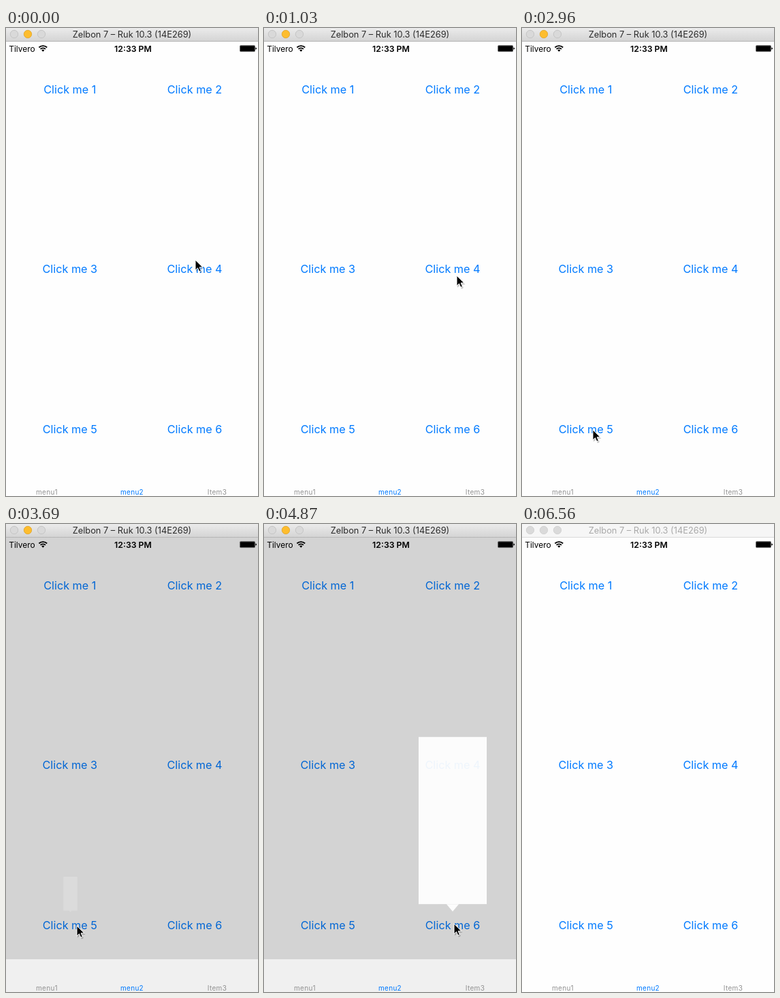
These frames come from a looping animation (370x686 px, 6660 ms). An HTML page:

```html
<!DOCTYPE html>
<html lang="en">
<head>
<meta charset="utf-8">
<title>Popover menus</title>
<style>
  html, body { margin: 0; width: 100%; height: 100%; overflow: hidden; background: #fefefe; }
  svg { display: block; width: 370px; height: 686px; font-family: Inter, Roboto, sans-serif; }
  text { text-anchor: middle; }
  .lamp { fill: #d9d9d9; stroke: #bfbfbf; stroke-width: .8; }
  .on { fill: #fdbd2e; stroke: #e0a325; }
  .title { font-size: 12.8px; fill: #2b2b2b; }
  .inactive .bar { fill: #f6f6f6; }
  .inactive .edge { fill: #dadada; }
  .inactive .title { fill: #a9a9a9; }
  .inactive .lamp { fill: #dadada; stroke: #cdcdcd; }
  .status { font-size: 12px; }
  .clock { font-size: 12.3px; font-weight: 600; }
  .button { font-size: 16.2px; fill: #007aff; }
  .tab { font-size: 10px; letter-spacing: .3px; fill: #929292; }
  .selected { fill: #007aff; }
</style>
</head>
<body>
<svg id="stage" viewBox="0 0 370 686">
  <defs>
    <linearGradient id="chrome" x2="0" y2="1">
      <stop stop-color="#ebebeb"/>
      <stop offset="1" stop-color="#d3d3d3"/>
    </linearGradient>
  </defs>
  <rect width="370" height="686" fill="#fefefe"/>
  <g id="buttons"></g>
  <rect id="dim" y="20" width="370" height="618" fill-opacity=".17"/>
  <rect id="tabBar" y="638" width="370" height="48" fill="#f0f0f0"/>

  <text class="tab" x="60" y="684">menu1</text>
  <text class="tab selected" x="185" y="684">menu2</text>
  <text class="tab" x="310" y="684">Item3</text>

  <text class="status" x="23.5" y="34.5">Tilvero</text>
  <g fill="none" stroke="#000" stroke-width="1.8" transform="translate(0 -.5)">
    <path d="M48.4 29a8.3 8.3 0 0 1 11.8 0M50.6 31.4a5.2 5.2 0 0 1 7.4 0"/>
    <path d="M54.3 35.2l-2.1-2.2a3 3 0 0 1 4.2 0z" fill="#000" stroke="none"/>
  </g>
  <text class="clock" x="186.5" y="34.5">12:33 PM</text>
  <rect x="343.4" y="25.6" width="22.2" height="9" rx="1.4" fill="#999" stroke="#333" stroke-width=".6"/>
  <rect x="344" y="26.2" width="21" height="7.8" rx=".6"/>
  <path d="M366.3 28.4q1.8 .4 1.8 1.7t-1.8 1.7z"/>

  <g id="popover">
    <rect id="panel" x="-53.5" width="107" height="262" fill="#fff"/>
    <path id="arrow" d="M0 0L-9.7 11.6H9.7z" fill="#fff"/>
  </g>

  <g id="titleBar">
    <rect class="bar" width="370" height="20" fill="url(#chrome)"/>
    <rect class="edge" y="19" width="370" height="1" fill="#b6b6b6"/>
    <circle class="lamp" cx="12" cy="9" r="5.7"/>
    <circle class="lamp on" cx="32" cy="9" r="5.7"/>
    <circle class="lamp" cx="52" cy="9" r="5.7"/>
    <text class="title" x="185" y="14">Zelbon 7 – Ruk 10.3 (14E269)</text>
  </g>

  <g id="cursor">
    <path d="M1 2v15.5l3.6-3.3 2.3 5.2 3-1.3-2.3-5h4.8z" opacity=".22"/>
    <path d="M0 0v15l3.5-3.3 2.3 5.4 2.6-1.1-2.3-5.2h4.9z" stroke="#fff" stroke-width="1"/>
  </g>
</svg>
<script>
const LOOP = 6660, TICK = 147.5, DEACTIVATE = 6560;
const $ = id => document.getElementById(id);

// Cursor waypoints: tick, x, y
const path = [
  [0, 278, 340], [1, 280, 348], [4, 281, 355], [5, 282, 359], [6, 282, 359],
  [7, 283, 363], [8, 262, 371], [11, 86, 356], [15, 86, 356], [20, 104, 589],
  [26, 104, 589], [27, 108, 591], [28, 108, 591], [31, 279, 586], [38, 279, 586],
  [40, 180, 284], [41, 300, 640], [42, 310, 695]
];

// Each menu grows from the tip of its arrow; scale is also its opacity.
const menus = [
  { button: 4, start: 2, x: 277, y: 374, dir: 1, scales: [.75, 1, .3] },
  { button: 3, start: 12, x: 94, y: 374, dir: 1, scales: [.785, .97, 1, .35] },
  { button: 5, start: 22, x: 94.5, y: 569, dir: -1, scales: [.7, .97, 1, .19] },
  { button: 6, start: 32, x: 277, y: 568, dir: -1, scales: [.4, .935, 1, .3] }
];

const buttons = Array.from({ length: 6 }, (_, i) => {
  const label = document.createElementNS("http://www.w3.org/2000/svg", "text");
  label.setAttribute("class", "button");
  label.setAttribute("x", i % 2 ? 277 : 93.8);
  label.setAttribute("y", [96, 359, 594][i >> 1]);
  label.textContent = `Click me ${i + 1}`;
  return $("buttons").appendChild(label);
});

function cursorAt(tick) {
  const next = path.findIndex(p => p[0] > tick);
  if (next < 0) return path[path.length - 1].slice(1);
  const [t0, x0, y0] = path[next - 1], [t1, x1, y1] = path[next];
  const k = (tick - t0) / (t1 - t0);
  return [x0 + (x1 - x0) * k, y0 + (y1 - y0) * k];
}

function show(el, visible) {
  el.style.display = visible ? "" : "none";
}

function draw(time) {
  const tick = Math.floor(time / TICK + .1);
  const menu = menus.find(m => tick >= m.start && tick < m.start + m.scales.length);
  for (const el of [$("dim"), $("tabBar"), $("popover")]) show(el, menu);
  if (menu) {
    const s = menu.scales[tick - menu.start];
    $("popover").setAttribute("transform",
      `translate(${menu.x} ${menu.y}) scale(${s})`);
    $("popover").setAttribute("opacity", s);
    $("panel").setAttribute("y", menu.dir > 0 ? 11.6 : -273.6);
    $("arrow").setAttribute("transform", `scale(1 ${menu.dir})`);
  }
  buttons.forEach((label, i) => {
    const m = menus.find(m => m.button === i + 1);
    const since = m ? tick - m.start : -9;
    label.setAttribute("opacity", since === -1 ? .3 : since === 0 ? .65 : 1);
  });
  $("cursor").setAttribute("transform", `translate(${cursorAt(tick)})`);
  $("titleBar").setAttribute("class", time >= DEACTIVATE ? "inactive" : "");
}

const begin = performance.now();
function loop() {
  draw((performance.now() - begin) % LOOP);
  requestAnimationFrame(loop);
}
loop();
</script>
</body>
</html>
```
